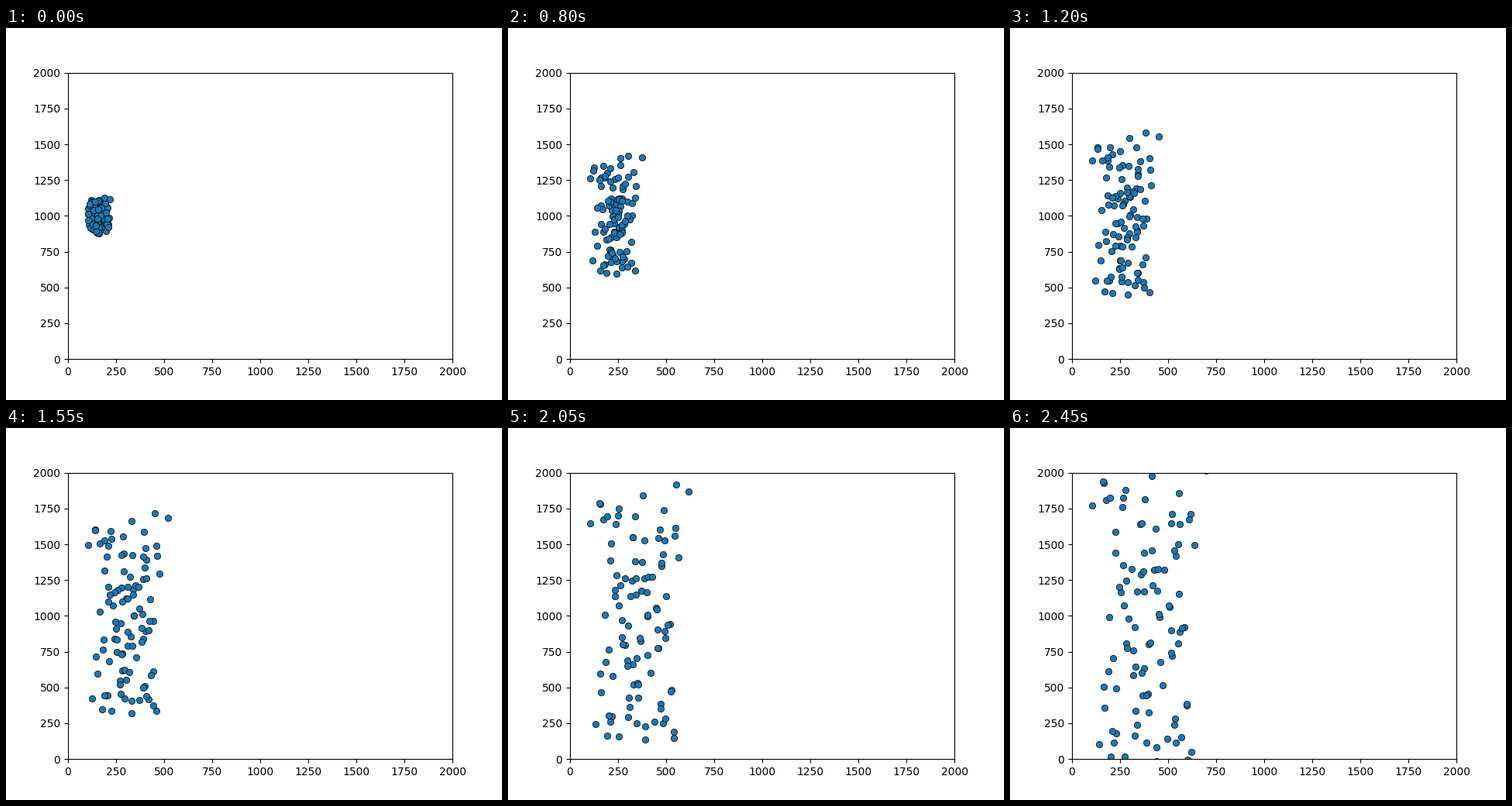
These frames come from a looping animation (640x480 px, 2.5 s). A matplotlib script:

```python
import matplotlib.pyplot as plt
import numpy as np
from matplotlib.animation import FuncAnimation

FRAMES = 50
INTERVAL = 50
LIMIT = 2000
COUNT = 92
LEAD = 2  # steps already taken when the loop opens

rng = np.random.default_rng(7)


def even(low, high):
    """COUNT random values spread evenly over a range, in random order."""
    slots = (np.arange(COUNT) + rng.random(COUNT)) / COUNT
    return low + (high - low) * rng.permutation(slots)


# Particles are released from a small box and drift right, up and down.
source = np.column_stack([even(100, 200), even(900, 1100)])
drift = np.column_stack([even(0.4, 9.2), even(-19, 18)])

# Outermost particles: x, y, speed in x, speed in y.
corners = np.array([
    (105, 1012, 0, 15.5),
    (103, 1014, 1.2, 18.9),
    (143, 1102, 10, 19.9),
    (217, 1115, 9.8, 18.3),
    (105, 970, 0.7, -17.7),
    (135, 906, 1.4, -18.1),
    (146, 893, 6, -18.5),
    (144, 931, 9.7, -18),
])

start = np.vstack([source + LEAD * drift, corners[:, :2]])
speed = np.vstack([drift, corners[:, 2:]])

fig, ax = plt.subplots(figsize=(6.4, 4.8), dpi=100)
ax.set_xlim(0, LIMIT)
ax.set_ylim(0, LIMIT)
dots = ax.scatter(start[:, 0], start[:, 1], s=36, color="C0",
                  edgecolors="black", linewidths=0.5)


def update(step):
    dots.set_offsets(start + speed * step)
    return (dots,)


anim = FuncAnimation(fig, update, frames=FRAMES, interval=INTERVAL,
                     repeat=True, repeat_delay=0)
plt.show()
```
